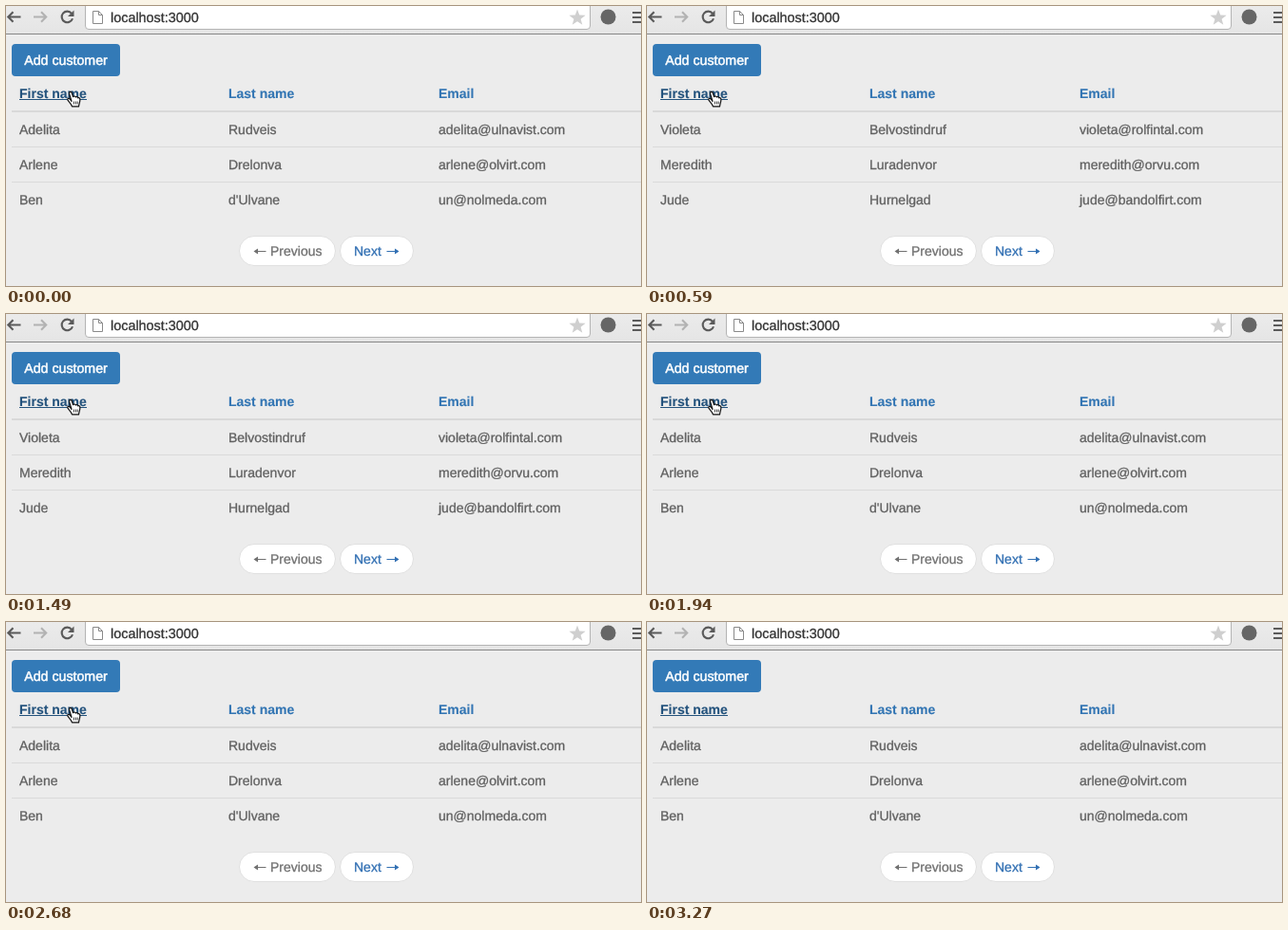
Recreate the animation shown at these times as an HTML page. Size 668x295 px, loop 3.57 s.

```html
<!DOCTYPE html>
<html lang="en">
<head>
<meta charset="utf-8">
<title>Customer list</title>
<style>
  html, body { margin: 0; width: 100%; height: 100%; overflow: hidden; background: #ececec; }
  svg { display: block; width: 668px; height: 295px; }
  text {
    font: 14px "Liberation Sans", Arial, sans-serif; white-space: pre;
    text-rendering: geometricPrecision;
    fill: currentColor; stroke: currentColor; stroke-width: .3;
  }
  .cell { color: #606060; }
  .head { color: #3275b3; }
  .head text { font-weight: 700; stroke-width: .1; }
  .hover { color: #23527c; }
  .icon { fill: none; stroke: #5a5a5a; stroke-width: 2.1; }
  .pill { fill: #fff; stroke: #e0e0e0; }
  .off { color: #707070; }
  .link { color: #3270b3; }
  .line { stroke: currentColor; stroke-width: 1.1; fill: currentColor; }
</style>
</head>
<body>
<svg viewBox="0 0 668 295">
  <defs>
    <linearGradient id="bar" x1="0" y1="0" x2="0" y2="1">
      <stop offset="0" stop-color="#ebebeb"/>
      <stop offset="1" stop-color="#e5e5e5"/>
    </linearGradient>
  </defs>
  <rect width="668" height="295" fill="#ececec"/>

  <!-- browser bar -->
  <rect width="668" height="29" fill="url(#bar)"/>
  <rect y="29" width="668" height="1" fill="#878787"/>
  <rect x="83.5" y="-8.5" width="531" height="33" rx="3.5" fill="#fff" stroke="#b4b4b4"/>
  <path class="icon" d="M15.5 11.5H2.5M7.500 6.300L2.300 11.500L7.500 16.700"/>
  <path class="icon" style="stroke:#b2b2b2" d="M29 11.5H42M37 6.300L42.200 11.500L37 16.700"/>
  <path class="icon" d="M69 7.800A5.800 5.800 0 1 0 70 13.200"/>
  <path d="M71.500 4.500V11H65Z" fill="#5a5a5a"/>
  <path d="M91.500 5.500H97.500L101.500 9.500V18.500H91.500ZM97.500 5.500V9.500H101.500" fill="#fff" stroke="#8a8a8a"/>
  <text x="110" y="17" style="font-size:14.4px;color:#333">localhost:3000</text>
  <path id="star" fill="#cfcfcf"/>
  <circle cx="633.5" cy="11.5" r="8" fill="#666"/>
  <path d="M659 7H668M659 12H668M659 17H668" stroke="#5a5a5a" stroke-width="2"/>

  <!-- page -->
  <rect x="6" y="40" width="114" height="34" rx="4" fill="#337ab7"/>
  <text x="63" y="62" text-anchor="middle" style="color:#fff;stroke-width:.5;font-size:14.2px">Add customer</text>
  <g class="head">
    <text class="hover" x="14" y="97">First name</text>
    <text x="234" y="97">Last name</text>
    <text x="455" y="97">Email</text>
  </g>
  <rect x="14" y="98" width="71" height="1" fill="#23527c"/>
  <rect x="6" y="110" width="662" height="2" fill="#d9d9d9"/>
  <rect x="6" y="148" width="662" height="1" fill="#dadada"/>
  <rect x="6" y="185" width="662" height="1" fill="#dadada"/>
  <g class="cell" id="cells"></g>

  <rect class="pill" x="245.500" y="242.500" width="101" height="31" rx="15.500"/>
  <rect class="pill" x="351.500" y="242.500" width="77" height="31" rx="15.500"/>
  <g class="off">
    <path class="line" d="M273.500 258.500H262M264.500 256.500L261.500 258.500L264.500 260.500Z"/>
    <text x="278" y="263">Previous</text>
  </g>
  <g class="link">
    <text x="366" y="263">Next</text>
    <path class="line" d="M400.500 258.500H412M409.500 256.500L412.500 258.500L409.500 260.500Z"/>
  </g>

  <!-- pointers -->
  <g id="hand" stroke="#111" stroke-linejoin="round">
    <path fill="#fff" stroke-width="1.200" d="M69 100.500L66.600 92.300C66.200 90.200 68.600 89.700 69.200 91.500L70.600 95.700C71.500 94.600 73 94.900 73.300 96C74.300 95.300 75.600 95.700 75.800 96.800C77 96.400 77.900 97.200 77.900 98.500C77.900 101 77 102.500 76.500 105.800H69.500C69 103.500 66.500 101.500 65 99.200C64 97.600 66 96.600 67.200 98Z"/>
    <path fill="none" stroke-width=".8" d="M71.500 100.500V103.500M73.500 100.500V103.500M75.300 100.500V103.500"/>
  </g>
  <path id="tip" fill="#111" stroke="#fff" stroke-width="1.2" d="M.8 1.500V16L4.200 12.800L6.600 18.300L9 17.300L6.700 11.900H11.500Z"/>
</svg>
<script>
const LOOP = 3570;
const pages = [
  [["Adelita", "Rudveis", "adelita@ulnavist.com"],
   ["Arlene", "Drelonva", "arlene@olvirt.com"],
   ["Ben", "d'Ulvane", "un@nolmeda.com"]],
  [["Violeta", "Belvostindruf", "violeta@rolfintal.com"],
   ["Meredith", "Luradenvor", "meredith@orvu.com"],
   ["Jude", "Hurnelgad", "jude@bandolfirt.com"]]
];
const flips = [590, 1040, 1490, 1940, 2380, 2680];
const stops = [[2830, 575, 178], [2980, 646, 209], [3120, 640, 280]];
const leave = 2830, gone = 3270;
const cols = [14, 234, 455];
const $ = id => document.getElementById(id);

const cells = [0, 1, 2].map(r => cols.map(x => {
  const t = document.createElementNS("http://www.w3.org/2000/svg", "text");
  t.setAttribute("x", x);
  t.setAttribute("y", 135 + 37 * r);
  return $("cells").appendChild(t);
}));

const star = Array.from({ length: 10 }, (_, i) => {
  const a = i * Math.PI / 5, r = i % 2 ? 3.8 : 9;
  return (601 + r * Math.sin(a)).toFixed(1) + " " + (12.5 - r * Math.cos(a)).toFixed(1);
});
$("star").setAttribute("d", "M" + star.join("L") + "Z");

let shown = -1;
function draw(t) {
  const page = flips.filter(f => t >= f).length % 2;
  if (page !== shown) {
    shown = page;
    cells.forEach((row, r) => row.forEach((c, i) => c.textContent = pages[page][r][i]));
  }
  $("hand").style.display = t < leave ? "" : "none";
  const stop = stops.filter(s => t >= s[0]).pop();
  const on = stop && t < gone;
  $("tip").style.display = on ? "" : "none";
  if (on) $("tip").setAttribute("transform", `translate(${stop[1]} ${stop[2]})`);
}

const start = performance.now();
function tick() {
  draw((performance.now() - start) % LOOP);
  requestAnimationFrame(tick);
}
tick();
</script>
</body>
</html>
```
